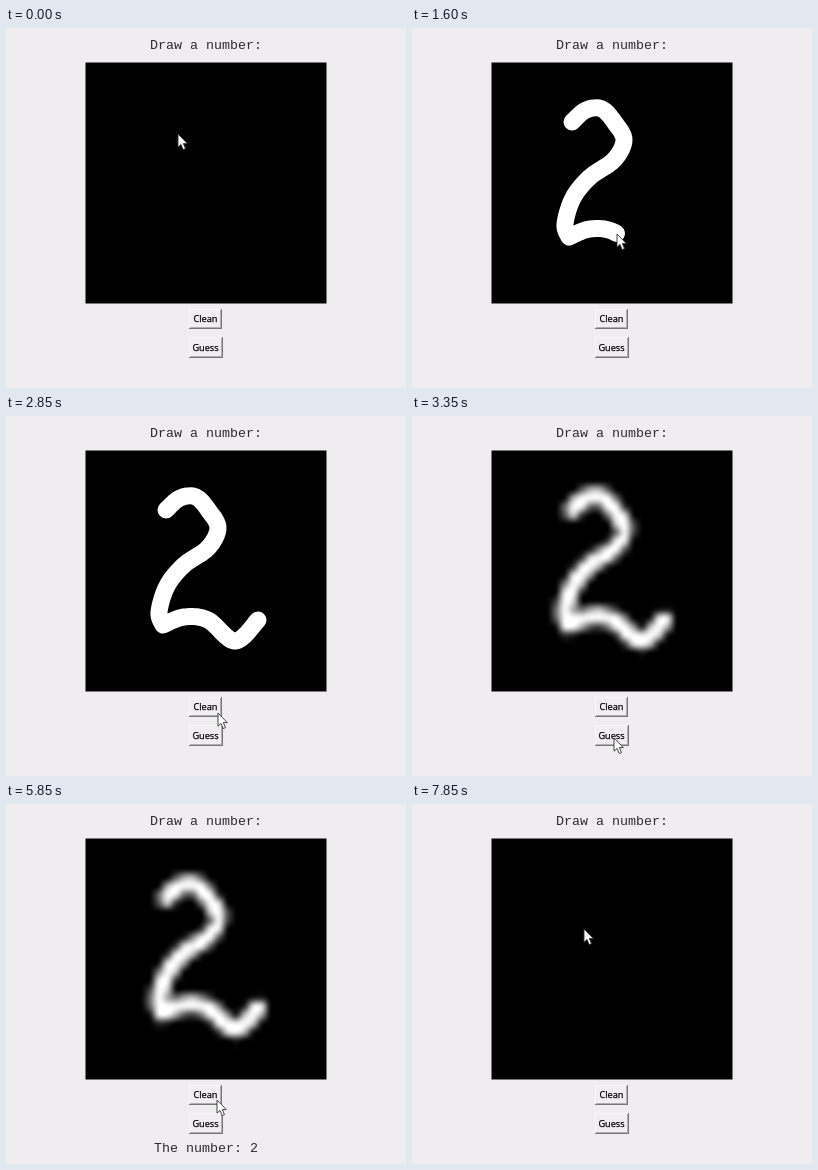
Animation, 400 px wide and 360 px high, one loop 8 s. Source, as an HTML page with a canvas:

```html
<!DOCTYPE html>
<html lang="en">
<head>
<meta charset="utf-8">
<title>Draw a number</title>
<style>
  html, body { margin: 0; width: 100%; height: 100%; overflow: hidden; background: #efedf0; }
  canvas { position: absolute; left: 80px; top: 35px; box-shadow: 0 0 0 .5px #000; }
  svg { position: absolute; left: 0; top: 0; }
  .label { font: 13.33px "Liberation Mono", monospace; fill: #2c2c2c; text-anchor: middle; }
  .caption { font: 9.2px "Open Sans", "Noto Sans", sans-serif; text-anchor: middle; stroke: #000; stroke-width: .25; }
</style>
</head>
<body>
<canvas id="board" width="240" height="240"></canvas>
<svg width="400" height="360" viewBox="0 0 400 360">
  <text class="label" x="200" y="21">Draw a number:</text>
  <g id="buttons"></g>
  <text id="answer" class="label" x="200" y="348">The number: 2</text>
  <path id="cursor" d="M0 0V13.2L3 10.4L5.2 15.6L7.5 14.6L5.3 9.6H9.3Z" fill="#fff" stroke="#333" stroke-width=".9"/>
</svg>
<script>
const LOOP = 8000, STEP = 50, SIZE = 240, GRID = 28, PEN = 17;
const SOFTEN = 3100, ANSWER = 5300, CLEAN = 6400;
const get = id => document.getElementById(id);
const linear = k => k;
const easeOut = k => 1 - (1 - k) ** 2;
const clamp = k => Math.min(1, Math.max(0, k));

const move = (start, end, points, ease = linear) => ({ start, end, points, ease });

const strokes = [
  move(200, 1300, [[160, 94], [174, 82], [190, 81], [203, 95], [212, 112],
    [202, 132], [178, 149], [161, 170], [153, 196], [157, 209]]),
  move(1420, 2000, [[157, 209], [178, 201], [202, 204], [229, 225], [252, 204]], easeOut)
];
const moves = [
  move(0, 50, [[172, 106], [168, 103]]),
  ...strokes,
  move(2320, 2950, [[252, 204], [240, 245], [202, 315]]),
  move(2950, 3800, [[202, 315], [202, 321], [208, 290]]),
  move(4350, 5150, [[208, 290], [205, 328], [204, 322]]),
  move(5300, 5850, [[204, 322], [211, 296]]),
  move(6150, 6950, [[211, 296], [201, 307]]),
  move(6950, 7350, [[201, 307], [178, 100], [175, 126]]),
  move(7500, 7850, [[175, 126], [172, 125]])
];

// Catmull-Rom curve through the points, with k from 0 to 1.
function curve(points, k) {
  const last = points.length - 1;
  const i = Math.min(last - 1, Math.floor(k * last));
  const u = k * last - i;
  const at = n => points[Math.min(last, Math.max(0, n))];
  return [0, 1].map(axis => {
    const [a, b, c, d] = [-1, 0, 1, 2].map(n => at(i + n)[axis]);
    return b + u / 2 * (c - a + u * (2 * a - 5 * b + 4 * c - d + u * (3 * (b - c) + d - a)));
  });
}

const progress = (m, t) => m.ease(clamp((t - m.start) / (m.end - m.start)));

function cursorAt(t) {
  const current = moves.filter(m => m.start <= t).pop();
  return curve(current.points, progress(current, t));
}

function drawInk(ctx, scale, t) {
  ctx.setTransform(scale, 0, 0, scale, -80 * scale, -35 * scale);
  ctx.fillRect(80, 35, SIZE, SIZE);
  if (t >= CLEAN) return;
  ctx.strokeStyle = "#fff";
  ctx.lineWidth = PEN;
  ctx.lineCap = ctx.lineJoin = "round";
  ctx.beginPath();
  for (const stroke of strokes.filter(s => s.start <= t)) {
    const reach = progress(stroke, t), samples = 60;
    ctx.moveTo(...stroke.points[0]);
    for (let i = 0; i <= samples; i++) ctx.lineTo(...curve(stroke.points, reach * i / samples));
  }
  ctx.stroke();
}

const board = get("board").getContext("2d");
const small = document.createElement("canvas");
small.width = small.height = GRID;

// The softened digit is a small bitmap enlarged with smoothing.
function drawBoard(t) {
  if (t < SOFTEN || t >= CLEAN) return drawInk(board, 1, t);
  drawInk(small.getContext("2d"), GRID / SIZE, t);
  board.resetTransform();
  board.imageSmoothingQuality = "high";
  board.drawImage(small, 0, 0, SIZE, SIZE);
}

function button(text, y, width, height) {
  const box = (inset, cut, fill) => `<rect x="${183 + inset}" y="${y + inset}"
    width="${width - inset - cut}" height="${height - inset - cut}" fill="${fill}"/>`;
  return `<g shape-rendering="crispEdges">${box(0, 0, "#777")}${box(0, 1, "#f8f7f8")}
    ${box(1, 1, "#b0afb0")}${box(1, 2, "#f0eef0")}</g>
    <text class="caption" x="199.5" y="${y + height - 7}">${text}</text>`;
}

function render(time) {
  const t = Math.floor(time % LOOP / STEP) * STEP;
  const [x, y] = cursorAt(t).map(Math.round);
  get("cursor").setAttribute("transform", `translate(${x} ${y})`);
  get("answer").setAttribute("visibility", t >= ANSWER && t < CLEAN ? "visible" : "hidden");
  drawBoard(t);
}

get("buttons").innerHTML = button("Clean", 281, 33, 20) + button("Guess", 309, 34, 21);
const start = performance.now();
function tick() {
  render(performance.now() - start);
  requestAnimationFrame(tick);
}
tick();
</script>
</body>
</html>
```
